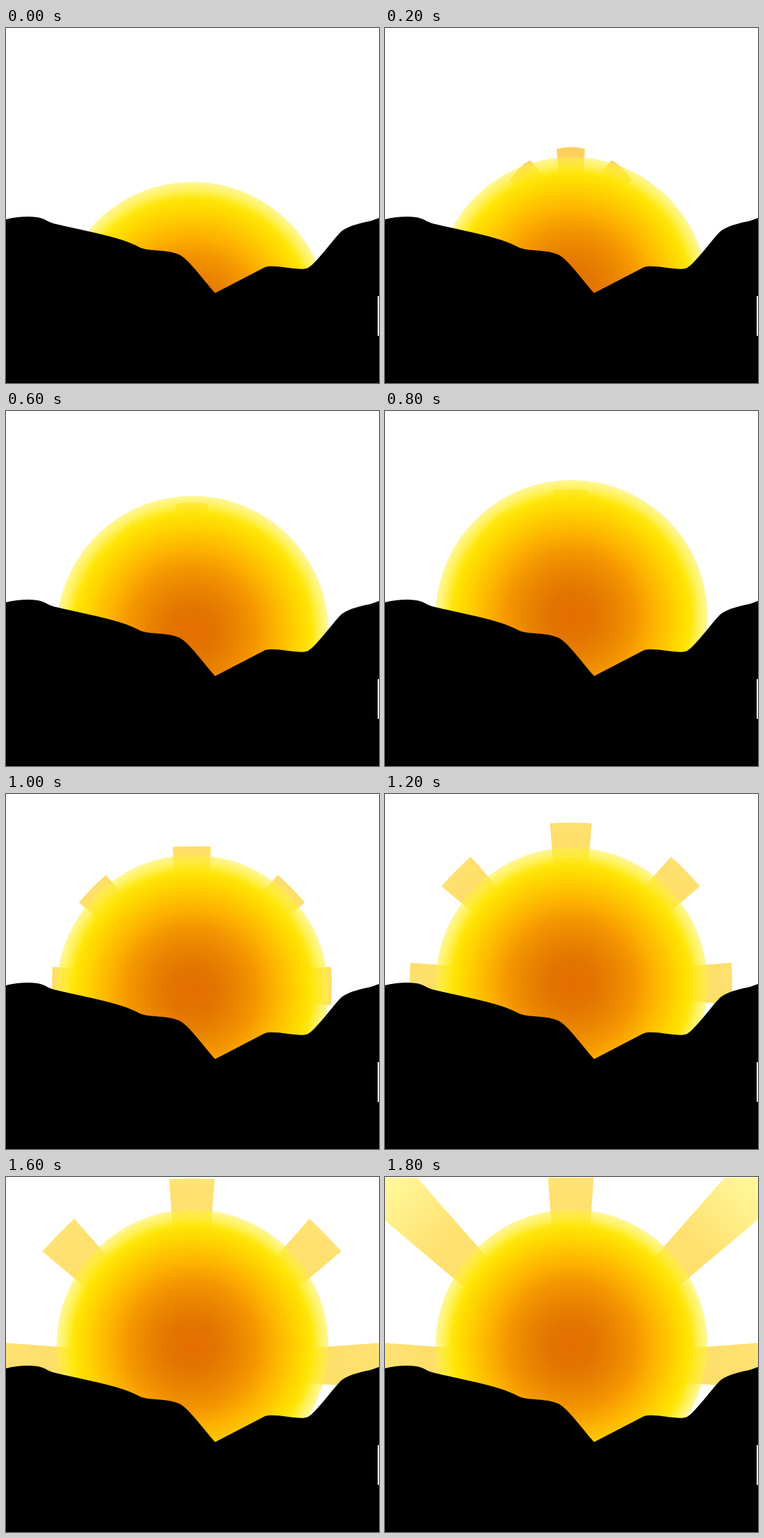
These frames come from a looping animation (553 by 527 pixels, 2000 ms). An HTML page with a canvas:

```html
<!DOCTYPE html>
<html lang="en">
<head>
<meta charset="utf-8">
<title>Sunrise</title>
<style>
  html, body { margin: 0; width: 100%; height: 100%; overflow: hidden; background: #fff; }
  canvas { display: block; }
</style>
</head>
<body>
<canvas id="stage" width="553" height="527"></canvas>
<script>
const W = 553, H = 527, STEP = 200, CX = 276, SUN_R = 201.5;
const ctx = document.getElementById('stage').getContext('2d');

// sun centre y, ray origin y, ray reach, bulge of the ray's outer end
const steps = [
  [430, 285, 0, 0],
  [393, 285, 107, 3],
  [361, 284, 127, 2],
  [327.5, 284, 147, 2],
  [304, 284, 167, 2],
  [292, 285, 207, 1],
  [281, 281.5, 238.5, 1],
  [264, 280, 257.5, 0.5],
  [250, 280, 277.5, 0.5],
  [250, 280, 430, 0]
];

const rayAngles = [0, 44.4, 90, 135.6, 180].map(a => a * Math.PI / 180);

const sunStops = [
  [0, '#e66e00'], [0.17, '#e27500'], [0.31, '#e98200'], [0.47, '#f49600'],
  [0.6, '#fdb000'], [0.72, '#ffc800'], [0.82, '#ffdc00'], [0.88, '#ffe60a'],
  [0.94, 'rgba(255,238,40,.77)'], [1, 'rgba(255,240,70,.55)']
];
const rayStops = [
  [0, '#ffd05c'], [0.25, '#ffd05e'], [0.46, '#ffde69'], [0.62, '#ffe172'],
  [0.72, '#ffea80'], [0.88, '#fff799'], [1, '#fff89e']
];

const hills = new Path2D(
  'M0 284C18 280 40 278 54 283C60 285 62 288 74 291C100 298 170 309 199 326' +
  'C212 332 240 328 258 337C272 345 290 371 310 393.5L384 355' +
  'C400 350 436 362 448 356C460 349 485 314 497 302C510 292 530 289 542 286' +
  'L553 282V398H551V457H553V527H0Z'
);

function radial(r, stops) {
  const g = ctx.createRadialGradient(0, 0, 0, 0, 0, r);
  for (const [at, color] of stops) g.addColorStop(at, color);
  return g;
}

const halfWidth = d => 13 + 0.075 * d;

function drawRay(angle, reach, bulge) {
  const inner = halfWidth(50), outer = halfWidth(reach);
  ctx.save();
  ctx.rotate(-angle);
  ctx.beginPath();
  ctx.moveTo(50, -inner);
  ctx.lineTo(reach - bulge / 2, -outer);
  ctx.quadraticCurveTo(reach + bulge * 1.5, 0, reach - bulge / 2, outer);
  ctx.lineTo(50, inner);
  ctx.fill();
  ctx.restore();
}

function drawRays(y, reach, bulge) {
  ctx.save();
  ctx.beginPath();
  ctx.rect(0, 1, W, H);
  ctx.clip();
  ctx.translate(CX - 0.5, y);
  ctx.fillStyle = radial(430, rayStops);
  for (const a of rayAngles) drawRay(a, reach, bulge);
  ctx.restore();
}

function drawSun(y) {
  ctx.save();
  ctx.translate(CX + 0.5, y);
  ctx.fillStyle = radial(SUN_R, sunStops);
  ctx.beginPath();
  ctx.arc(0, 0, SUN_R, 0, Math.PI * 2);
  ctx.fill();
  ctx.restore();
}

function draw(index) {
  const [sunY, rayY, reach, bulge] = steps[index];
  ctx.fillStyle = '#fff';
  ctx.fillRect(0, 0, W, H);
  if (reach) drawRays(rayY, reach, bulge);
  drawSun(sunY);
  ctx.fillStyle = '#000';
  ctx.fill(hills);
}

const start = performance.now();
function tick() {
  const t = Math.max(0, performance.now() - start);
  draw(Math.floor(t / STEP) % steps.length);
  requestAnimationFrame(tick);
}
tick();
</script>
</body>
</html>
```
